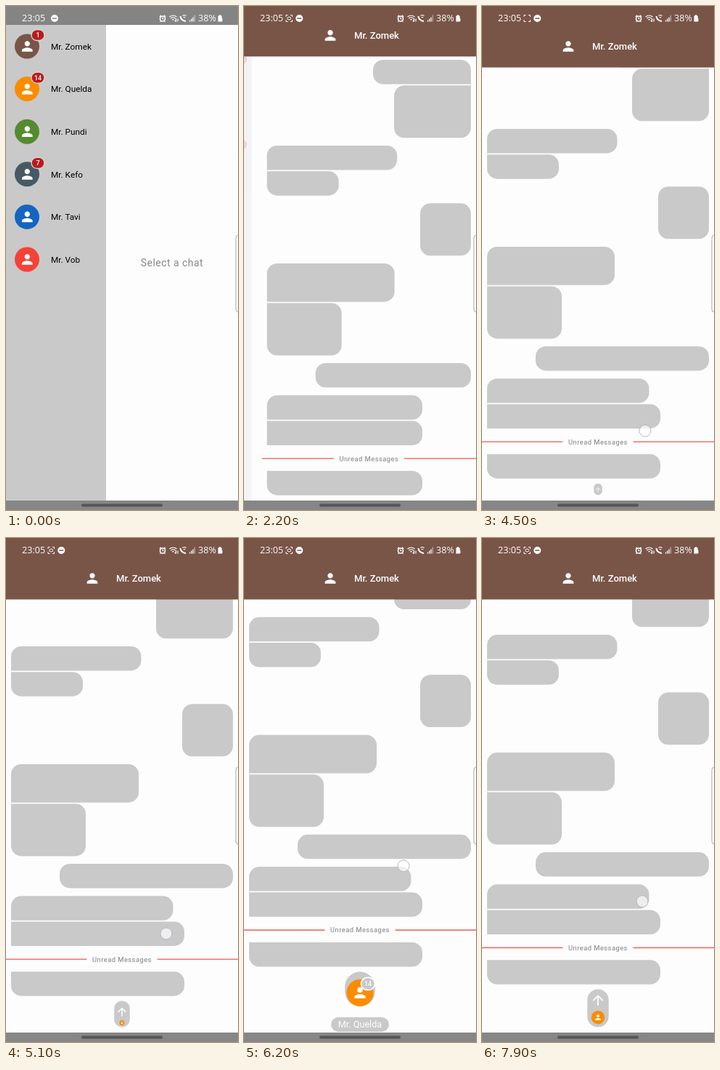
An HTML page that plays this animation: 320x693 px, repeating every 8 s.

```html
<!DOCTYPE html>
<html lang="en">
<head>
<meta charset="utf-8">
<title>Chat pull to next</title>
<style>
  html, body { margin: 0; width: 100%; height: 100%; overflow: hidden; background: #fdfdfd; }
  svg { display: block; width: 320px; height: 693px; font-family: Roboto, sans-serif; }
  .mid { text-anchor: middle; }
  .status { font: 12.6px "Open Sans", sans-serif; fill: #fff; }
</style>
</head>
<body>
<svg id="stage" viewBox="0 0 320 693">
  <defs>
    <path id="person" d="M0 0c2.21 0 4-1.79 4-4s-1.79-4-4-4-4 1.79-4 4 1.79 4 4 4zm0 2c-2.67 0-8 1.34-8 4v2h16v-2c0-2.66-5.33-4-8-4z"/>
    <clipPath id="panelClip"><rect id="panelEdge" y="26" width="138" height="654"/></clipPath>
  </defs>
  <rect width="320" height="693" fill="#fdfdfd"/>
  <rect width="320" height="26" fill="#848484"/>

  <text id="hint" class="mid" y="357.5" font-size="14" letter-spacing=".47" fill="#888">Select a chat</text>

  <g id="chat">
    <g id="messages">
      <g id="bubbles" fill="#c9c9c9"></g>
      <path id="rule" stroke="#f47272" stroke-width="1.6"/>
      <text id="unread" class="mid" y="625.6" font-size="9.4" letter-spacing=".45" fill="#808080">Unread Messages</text>
    </g>
    <g id="pull">
      <rect id="pill" fill="#c9c9c9"/>
      <path id="arrow" d="M0 6V-6M-6 0L0-6L6 0" fill="none" stroke="#fff" stroke-width="1.6"/>
      <g id="next">
        <circle r="19" fill="#fb8c00"/>
        <use href="#person" fill="#fff"/>
      </g>
      <g id="count">
        <rect x="161.5" y="599.5" width="19" height="17" rx="8.5" fill="#c9c9c9" stroke="#fff" stroke-width="1.8"/>
        <text class="mid" x="171" y="611.2" font-size="9" font-weight="500" fill="#fff">14</text>
      </g>
      <g id="label">
        <rect x="120" y="659" width="80" height="20" rx="10" fill="#c9c9c9"/>
        <text class="mid" x="160" y="673.3" font-size="12.6" fill="#fff">Mr. Quelda</text>
      </g>
    </g>
  </g>

  <g id="panel" clip-path="url(#panelClip)">
    <rect y="26" width="138" height="654" fill="#c9c9c9"/>
    <g id="list"></g>
  </g>

  <g id="header">
    <rect width="320" height="84.5" fill="#795548"/>
    <use href="#person" fill="#fff" transform="translate(119 55.5) scale(.92)"/>
    <text x="152" y="60" font-size="13" font-weight="500" fill="#fff">Mr. Zomek</text>
  </g>

  <g fill="#fff">
    <text class="status" x="22" y="21.3">23:05</text>
    <text class="status" x="265" y="21.3">38%</text>
    <g id="capture">
      <path d="M58 15v-2.5h2.5M64 12.5h2.5V15M66.5 19v2.5H64M60.500 21.500H58V19" fill="none" stroke="#fff"/>
      <rect id="dot" x="60" y="15.200" width="4.500" height="3.600" rx="1.500" fill="none" stroke="#fff"/>
    </g>
    <path id="mute" fill-rule="evenodd" d="M-5 17a5 5 0 0 1 10 0a5 5 0 0 1-10 0zM-3 16.200v1.600h6v-1.600z"/>
    <g fill="none" stroke="#fff" stroke-width="1.200">
      <circle cx="216" cy="17.500" r="3.500" stroke-width="1.600"/>
      <path d="M216 15.500v2.200h1.500M211.800 14.800l2.200-2M220.200 14.800l-2.200-2M213.500 20.500l-1 1.500M218.500 20.500l1 1.500"/>
      <path d="M225.500 15q5-4 10 0M227.300 17q3.200-2.500 6.400 0M229 19q1.500-1 3 0M234.500 17v4.500M232.700 19.800l1.800 1.800M237 21.500v-4"/>
      <path d="M240.500 14q.5 6 7.500 7" stroke-width="2.200"/>
      <path d="M243.500 13.500q2.500-2 5 0M244.800 15.800q1.200-1 2.500 0"/>
      <path d="M253.500 21.500v-2M255.800 21.500v-4M258 21.500v-6" stroke-width="1.300"/>
      <path d="M260.300 21.500v-9" stroke-width="1.300" opacity=".5"/>
    </g>
    <path d="M292.500 14q0-.8.8-.8h.8v-1h2v1h.8q.8 0 .8.8v7.500h-5.200z"/>
    <path d="M296.800 17v4h1.800v-4z" opacity=".8"/>
  </g>

  <circle id="touch" r="8" fill="#fff" fill-opacity=".68" stroke="#b0b0bd" stroke-width=".9"/>
  <rect x="317" y="315" width="10" height="106" rx="4" fill="#fff" stroke="#aaa"/>
  <rect y="680" width="320" height="13" fill="#868686"/>
  <rect x="104" y="684.500" width="112" height="4" rx="2" fill="#565656"/>
</svg>
<script>
const $ = id => document.getElementById(id);
const set = (el, attrs) => { for (const k in attrs) el.setAttribute(k, attrs[k]); };
const clamp = v => Math.min(1, Math.max(0, v));
const mix = (a, b, k) => a + (b - a) * k;
const ramp = (t, from, to) => clamp((t - from) / (to - from));

const LOOP = 8000, PANEL = 138, HEADER = 84.5;

// Contact list
const contacts = [
  ['Mr. Zomek', '#795548', 1], ['Mr. Quelda', '#fb8c00', 14], ['Mr. Pundi', '#558b2f', 0],
  ['Mr. Kefo', '#455a64', 7], ['Mr. Tavi', '#1565c0', 0], ['Mr. Vob', '#f44336', 0]
];
$('list').innerHTML = contacts.map(([name, color, unread], i) => `
  <g transform="translate(0 ${55.5 + i * 58.6})">
    <circle cx="29" r="17" fill="${color}"/>
    <use href="#person" fill="#fff" transform="translate(29.300 0) scale(.92)"/>
    <text x="62" y="4.200" font-size="11.800">${name}</text>
    ${unread ? `<rect x="35" y="-23" width="18" height="15" rx="7.500" fill="#b71c1c" stroke="#d6d6d6" stroke-width="1.300"/>
    <text class="mid" x="44" y="-12.300" font-size="9" font-weight="500" fill="#fff">${unread}</text>` : ''}
  </g>`).join('');

// Messages: side, top, height, natural width, joined above, joined below
const messages = [
  ['R', 74, 33.5, 135, 0, 1], ['R', 109.3, 72, 106, 1, 0],
  ['L', 192, 33.5, 179.5, 0, 1], ['L', 227.2, 33.5, 99, 1, 0],
  ['R', 271.3, 72, 70, 0, 0],
  ['L', 354, 52.7, 176, 0, 1], ['L', 408.5, 72, 103, 1, 0],
  ['R', 491, 33.5, 260, 0, 0],
  ['L', 535.3, 33.5, 223.5, 0, 1], ['L', 570.5, 33.5, 260, 1, 1], ['L', 639.2, 33.5, 260, 1, 0]
].map(([side, y, h, w, above, below]) => {
  const el = document.createElementNS('http://www.w3.org/2000/svg', 'path');
  $('bubbles').append(el);
  return { el, side, y, h, w, above, below };
});

function bubblePath(m, left) {
  const w = Math.min(m.w, 320 - left - 81);
  const x = m.side === 'L' ? left + 7 : 313 - w;
  const top = m.above ? 0 : 14, low = m.below ? 0 : 14;
  const [tl, bl, tr, br] = m.side === 'L' ? [top, low, 14, 14] : [14, 14, top, low];
  const arc = (r, dx, dy) => `a${r} ${r} 0 0 1 ${dx * r} ${dy * r}`;
  return `M${x + tl} ${m.y}H${x + w - tr}${arc(tr, 1, 1)}V${m.y + m.h - br}${arc(br, -1, 1)}` +
         `H${x + bl}${arc(bl, -1, -1)}V${m.y + tl}${arc(tl, 1, -1)}z`;
}

// Smooth curve through [time, value] points
function curve(points) {
  const slope = i => {
    const a = points[Math.max(0, i - 1)], b = points[Math.min(points.length - 1, i + 1)];
    return i ? (b[1] - a[1]) / (b[0] - a[0]) : 0;
  };
  return t => {
    if (t <= points[0][0]) return points[0][1];
    let i = 0;
    while (i < points.length - 2 && t > points[i + 1][0]) i++;
    const [t0, v0] = points[i], [t1, v1] = points[i + 1];
    const d = t1 - t0, s = (t - t0) / d, s2 = s * s, s3 = s2 * s;
    return (2 * s3 - 3 * s2 + 1) * v0 + (s3 - 2 * s2 + s) * d * slope(i) +
           (3 * s2 - 2 * s3) * v1 + (s3 - s2) * d * slope(i + 1);
  };
}
const pullAt = curve([[3500, 0], [3900, 5.5], [5100, 43], [5700, 68.5], [6300, 85.5], [6650, 90], [7100, 88], [7900, 59]]);
const touchX = curve([[3550, 230], [3900, 229], [5100, 221], [5700, 219], [7100, 222.5], [7900, 221]]);
const touchY = curve([[3550, 632], [3900, 620], [5100, 544], [5700, 492.5], [6300, 443], [6650, 417], [7100, 423], [7900, 499.5]]);

// cubic-bezier(.4, 0, .2, 1)
function standardEase(x) {
  let lo = 0, hi = 1, s = x;
  for (let i = 0; i < 24; i++) {
    s = (lo + hi) / 2;
    const u = 1 - s;
    if (1.2 * u * u * s + .6 * u * s * s + s * s * s < x) lo = s; else hi = s;
  }
  return s * s * (3 - 2 * s);
}

function drawStatus(t) {
  const shift = ramp(t, 50, 200);
  set($('mute'), { transform: `translate(${mix(67, 76.3, shift)} 0)` });
  set($('capture'), { opacity: shift });
  const beat = Math.floor((t < 1600 ? t : t + 100) / 500);
  set($('dot'), { opacity: beat % 2 ? 0 : 1 });
}

function drawOpen(p) {
  const left = PANEL * (1 - p), center = (left + 320) / 2;
  set($('hint'), { x: center, opacity: clamp(1 - 3 * p) });
  set($('header'), { transform: `translate(0 ${-HEADER * (1 - p)})`, visibility: p > 0 ? 'visible' : 'hidden' });
  set($('panel'), { opacity: 1 - p });
  set($('panelEdge'), { width: PANEL * Math.pow(1 - p, 1.5) });
  set($('list'), { transform: `translate(${-58.6 * p} ${-31 * p})` });
  set($('chat'), { opacity: clamp(2.5 * p) });
  for (const m of messages) set(m.el, { d: bubblePath(m, left) });
  set($('rule'), { d: `M${left} 622.3H${center - 48.5}M${center + 48.5} 622.3H320` });
  set($('unread'), { x: center });
}

function drawPull(t) {
  const d = pullAt(t);
  const armed = ramp(t, 6050, 6200) * (1 - ramp(t, 7300, 7450));
  set($('messages'), { transform: `translate(0 ${-d})` });
  set($('pull'), { visibility: d > 8 ? 'visible' : 'hidden' });

  const top = 679.5 - d, bottom = mix(672.5, 644, armed), w = d / 2;
  set($('pill'), { x: 160 - w / 2, y: top, width: w, height: Math.max(0, bottom - top), rx: w / 2 });
  const size = Math.min(1, d / 52) * 1.1;
  set($('arrow'), {
    transform: `translate(160 ${top + Math.min(15.5, d * .38)}) scale(${size})`,
    opacity: clamp(1 - 2 * armed)
  });
  const r = mix(Math.max(0, 3.5 + (d - 43) * .36), 18.5, armed);
  const y = mix(672.5 - r - Math.max(0, (d - 18) * .1), top + 29, armed);
  set($('next'), { transform: `translate(160 ${y}) scale(${r / 19})` });
  set($('count'), { opacity: armed, transform: `translate(0 ${88 - d})` });
  set($('label'), { opacity: armed });
  set($('touch'), { cx: touchX(t), cy: touchY(t), opacity: ramp(t, 3550, 3600) });
}

function frame(now) {
  const t = now % LOOP;
  drawStatus(t);
  drawOpen(standardEase(ramp(t, 1780, 2560)));
  drawPull(t);
  requestAnimationFrame(frame);
}
const start = performance.now();
frame(0);
function tick() { return performance.now() - start; }
</script>
</body>
</html>
```
